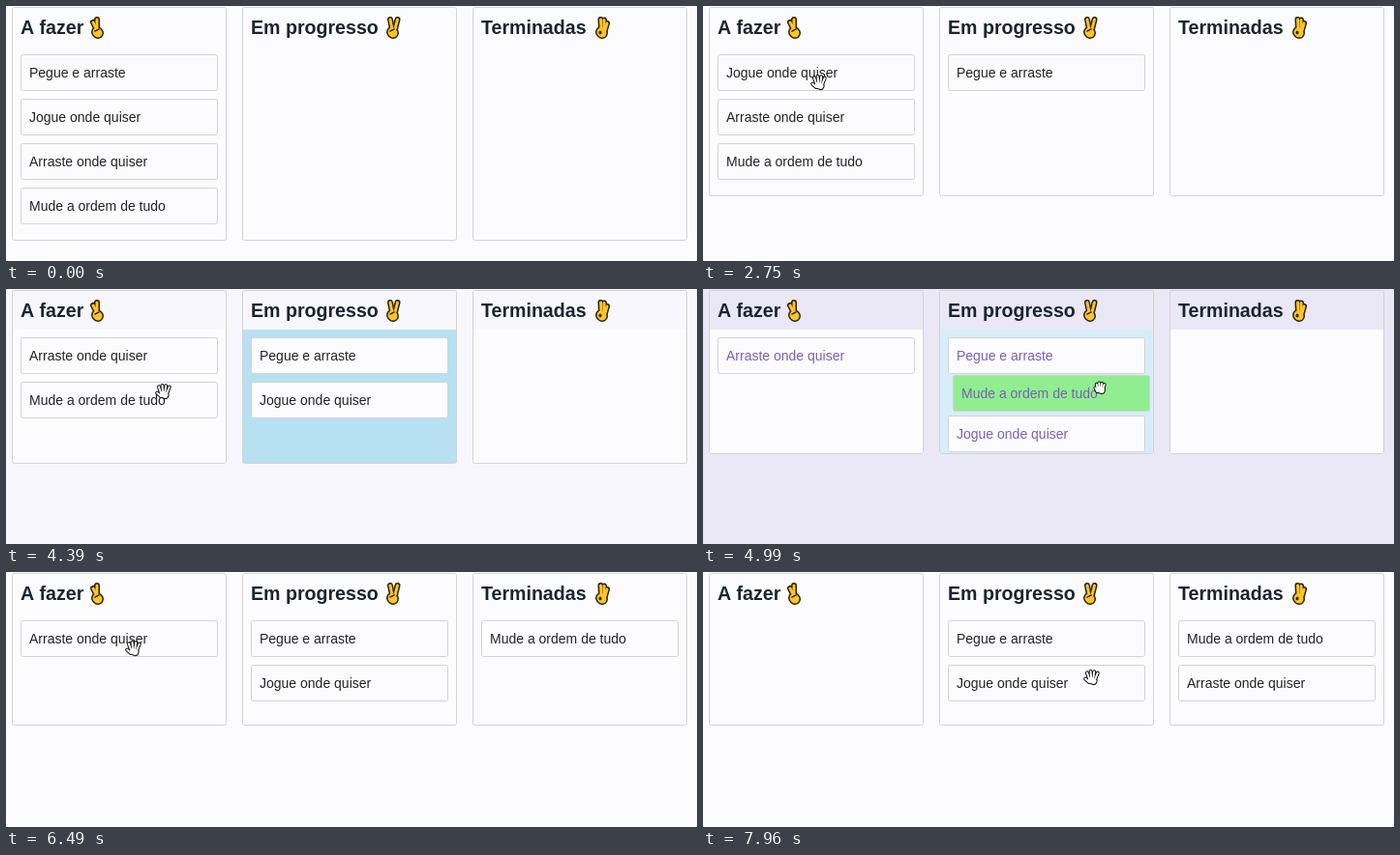
Animation, 714 px wide and 264 px high, one loop 8 s. Source, as an HTML page with a canvas:

```html
<!DOCTYPE html>
<html lang="pt">
<head>
<meta charset="utf-8">
<title>Quadro de tarefas</title>
<style>
html, body { margin: 0; width: 100%; height: 100%; overflow: hidden; background: #fcfcfe; }
canvas { display: block; }
</style>
</head>
<body>
<canvas id="stage" width="714" height="264"></canvas>
<script>
const ctx = document.getElementById('stage').getContext('2d');
const LOOP = 8000, SHIFT = 250, SETTLE = 350, REST = 120;
const FONT = '"Liberation Sans", Arial, sans-serif';
const PAPER = '#fcfcfe', EDGE = '#d3d3d3', INK = [34, 36, 32], PURPLE = [122, 96, 182];

const titles = ['A fazer', 'Em progresso', 'Terminadas'];
const tasks = ['Pegue e arraste', 'Jogue onde quiser', 'Arraste onde quiser', 'Mude a ordem de tudo'];

// grab: pointer inside the card; stops: [time, column, row]; via: pointer [time, x, y]
const moves = [
  { card: 0, lift: 990, drop: 2050, grab: [110, 22], leave: 1320, stops: [[1320, 1, 0]],
    via: [[1760, 372, 108], [2050, 366, 76]] },
  { card: 1, lift: 2850, drop: 3930, grab: [109, 32], leave: 3080, stops: [[3080, 1, 1]],
    via: [[3480, 398, 158], [3930, 365, 132]] },
  { card: 3, lift: 4480, drop: 5760, grab: [152, 13], leave: 4740, stops: [[4897, 1, 1], [5300, 2, 0]],
    via: [[4990, 410, 102], [5630, 617, 61], [5760, 640, 70]] },
  { card: 2, lift: 6600, drop: 7230, grab: [121, 32], leave: 6720, stops: [[6780, 2, 1]],
    via: [[7010, 596, 116], [7230, 615, 128]] }
];

const clamp = v => Math.max(0, Math.min(1, v));
const smooth = v => { v = clamp(v); return v * v * (3 - 2 * v); };
const swift = v => 1 - (1 - clamp(v)) ** 3;
const mix = (a, b, p) => a + (b - a) * p;
const within = (t, a, b) => t >= a && t < b;
const slotPoint = (col, row) => [15 + 238 * col, 50 + 46 * row];
const heldTime = (m, t) => within(t, m.lift, m.drop);
const land = m => m.drop + SETTLE;
const lifted = (m, t) => within(t, m.lift, land(m));

function lastIndex(keys, t) {
  let i = 0;
  while (i + 1 < keys.length && keys[i + 1][0] <= t) i++;
  return i;
}

// value k of a keyed track, eased from the previous key
function settle(keys, t, k, ease) {
  const i = lastIndex(keys, t);
  return i ? mix(keys[i - 1][k], keys[i][k], ease((t - keys[i][0]) / SHIFT)) : keys[0][k];
}

// replay the moves to get every track
const lists = [[0, 1, 2, 3], [], []];
const slots = tasks.map((_, i) => [[0, ...slotPoint(0, i)]]);
const bottoms = [[0, 243]], tints = [[0, 0]], zones = [], path = [[170, 340, 275]];

function place(t, card, col, row, gap) {
  const shown = row + (gap && gap[1] === col && row >= gap[2] ? 1 : 0);
  const point = slotPoint(col, shown), last = slots[card].at(-1);
  if (point[0] !== last[1] || point[1] !== last[2]) slots[card].push([t, ...point]);
}

function arrange(t, gap, moving, home) {
  let rows = 0;
  lists.forEach((list, col) => {
    const others = list.filter(c => c !== moving);
    others.forEach((c, row) => place(t, c, col, row, gap));
    const extra = gap && gap[1] === col && col !== home ? 1 : 0;
    rows = Math.max(rows, list.length + extra);
  });
  const bottom = Math.max(159, 59 + 46 * rows);
  if (bottom !== bottoms.at(-1)[1]) bottoms.push([t, bottom]);
  tints.push([t, gap ? gap[2] / tasks.length : 0]);
}

for (const m of moves) {
  const home = lists.findIndex(list => list.includes(m.card));
  const [, x, y] = slots[m.card].at(-1);
  const pick = [x + m.grab[0], y + m.grab[1]];
  const [, dropX, dropY] = m.via.at(-1);
  path.push([m.lift - REST, ...pick], [m.lift, ...pick], ...m.via, [m.drop + REST, dropX, dropY]);

  zones.push([home, m.lift, m.leave]);
  if (m.leave < m.stops[0][0]) arrange(m.leave, null, m.card, home);
  m.stops.forEach((stop, i) => {
    arrange(stop[0], stop, m.card, home);
    zones.push([stop[1], stop[0], i + 1 < m.stops.length ? m.stops[i + 1][0] : land(m)]);
  });

  const [, col, row] = m.stops.at(-1);
  lists[home] = lists[home].filter(c => c !== m.card);
  lists[col].splice(row, 0, m.card);
  slots[m.card].push([m.drop, ...slotPoint(col, row)]);
  arrange(land(m), null, -1, -1);
}
path.push([7960, 406, 112], [LOOP, 406, 112]);

// monotone cubic through the keys, so rests stay still
function glide(keys, t, k) {
  const i = Math.min(lastIndex(keys, t), keys.length - 2);
  const slope = j => keys[j] && keys[j + 1] ? (keys[j + 1][k] - keys[j][k]) / (keys[j + 1][0] - keys[j][0]) : 0;
  const tangent = j => {
    const a = slope(j - 1), b = slope(j);
    return a * b > 0 ? 2 * a * b / (a + b) : 0;
  };
  const [a, b] = [keys[i], keys[i + 1]];
  const span = b[0] - a[0], p = clamp((t - a[0]) / span), q = 1 - p;
  return a[k] * (1 + 2 * p) * q * q + b[k] * p * p * (3 - 2 * p)
    + span * p * q * (tangent(i) * q - tangent(i + 1) * p);
}

const pointer = t => [glide(path, t, 1), glide(path, t, 2)];

function cardPoint(card, t) {
  const m = moves.find(move => move.card === card);
  const point = [0, 1].map(k => {
    const at = pointer(Math.min(t, m.drop))[k] - m.grab[k];
    if (heldTime(m, t)) return at;
    if (lifted(m, t)) return mix(at, slotPoint(...m.stops.at(-1).slice(1))[k], swift((t - m.drop) / SETTLE));
    return settle(slots[card], t, k + 1, swift);
  });
  return point.map(Math.round);
}

function box(x, y, w, h, fill) {
  ctx.beginPath();
  ctx.roundRect(x + 0.5, y + 0.5, w - 1, h - 1, 2);
  if (fill) { ctx.fillStyle = fill; ctx.fill(); }
  ctx.strokeStyle = EDGE;
  ctx.lineWidth = 1;
  ctx.stroke();
}

function label(text, x, y, font, color) {
  ctx.font = font + ' ' + FONT;
  ctx.fillStyle = color;
  ctx.fillText(text, x, y);
}

// rounded strokes [width, x, y, x, y] merged under one outline
function limbs(parts, fill, line, rim) {
  ctx.lineCap = ctx.lineJoin = 'round';
  for (const [color, extra] of [[line, rim * 2], [fill, 0]]) {
    ctx.strokeStyle = color;
    for (const [width, x1, y1, x2, y2] of parts) {
      ctx.lineWidth = width + extra;
      ctx.beginPath();
      ctx.moveTo(x1, y1);
      ctx.lineTo(x2, y2);
      ctx.stroke();
    }
  }
}

const palm = [9, 8, 16, 9, 17];
const signs = [
  [palm, [3, 8, 3, 8, 12], [3, 4, 6, 8, 14]],
  [palm, [3, 6, 3, 8, 13], [3, 13.5, 3, 11, 13]],
  [palm, [3, 7.5, 3, 8, 12], [3, 11, 3.5, 11, 12], [3, 14, 7, 12, 14]]
];

function emoji(i, x) {
  ctx.save();
  ctx.translate(x, 11);
  limbs(signs[i], '#fcc526', '#2c2010', 1.5);
  const mark = i === 2 ? [2.6, 7, 16, 7, 17] : [1.2, 6, 15, 10, 13];
  limbs([mark], '#3a2606', '#3a2606', 0);
  ctx.restore();
}

// four fingers, a thumb and a palm
function hand(reach, spread) {
  const parts = [[2, -1.9 * spread, 0.5, -3, 4], [6, -1, 2, 1.5, 3]];
  for (let i = 0; i < 4; i++) {
    const bend = Math.abs(i - 1.4);
    parts.push([2, (i - 1.4) * spread, bend * 1.3 - reach, (i - 1.4) * 2, 1]);
  }
  limbs(parts, '#fff', '#111', 1);
}

function arrow() {
  const tip = new Path2D('M0 0V16L4 12.5L6.5 18L9 17L6.5 11.5H11.5Z');
  ctx.fillStyle = '#fff';
  ctx.fill(tip);
  ctx.strokeStyle = '#000';
  ctx.lineWidth = 1;
  ctx.stroke(tip);
}

function drawPointer(t) {
  if (t < path[0][0]) return;
  const [x, y] = pointer(t);
  const over = tasks.some((_, i) => {
    const [cx, cy] = cardPoint(i, t);
    return within(x, cx, cx + 204) && within(y, cy, cy + 38);
  });
  ctx.save();
  ctx.translate(x, y);
  if (moves.some(m => heldTime(m, t))) hand(5, 2.6);
  else if (over) {
    ctx.translate(-4, -2);
    hand(7.5, 3.6);
  } else arrow();
  ctx.restore();
}

function drawColumn(i, t, bottom) {
  const x = 6 + 238 * i;
  ctx.fillStyle = PAPER;
  ctx.fillRect(x, 42, 222, bottom - 42);
  ctx.fillStyle = 'skyblue';
  for (const [col, from, to] of zones) {
    if (col !== i) continue;
    ctx.globalAlpha = smooth((t - from) / SHIFT) * (1 - smooth((t - to) / SHIFT));
    ctx.fillRect(x + 1, 42, 220, bottom - 43);
  }
  ctx.globalAlpha = 1;
  box(x, 1, 222, bottom - 1);
  label(titles[i], x + 9, 29, 'bold 19.6px', '#1a2430');
  emoji(i, [86, 391, 607][i]);
}

function drawCard(i, t, color) {
  const [x, y] = cardPoint(i, t);
  const up = moves.some(m => m.card === i && lifted(m, t));
  box(x, y, 204, 38, up ? 'lightgreen' : PAPER);
  label(tasks[i], x + 9, y + 24, '14px', color);
}

function render(t) {
  const bottom = Math.round(settle(bottoms, t, 1, smooth));
  const current = moves.find(m => lifted(m, t));
  const warm = current ? smooth((t - current.lift) / SHIFT) : 0;
  const color = `rgb(${INK.map((v, k) => mix(v, PURPLE[k], warm))})`;
  ctx.fillStyle = PAPER;
  ctx.fillRect(0, 0, 714, 264);
  ctx.fillStyle = `rgba(153, 141, 217, ${settle(tints, t, 1, swift)})`;
  ctx.fillRect(0, 0, 714, 264);
  titles.forEach((_, i) => drawColumn(i, t, bottom));
  tasks.forEach((_, i) => {
    if (!current || i !== current.card) drawCard(i, t, color);
  });
  if (current) drawCard(current.card, t, color);
  drawPointer(t);
}

const began = performance.now();
function tick() {
  render((performance.now() - began) % LOOP);
  requestAnimationFrame(tick);
}
tick();
</script>
</body>
</html>
```
